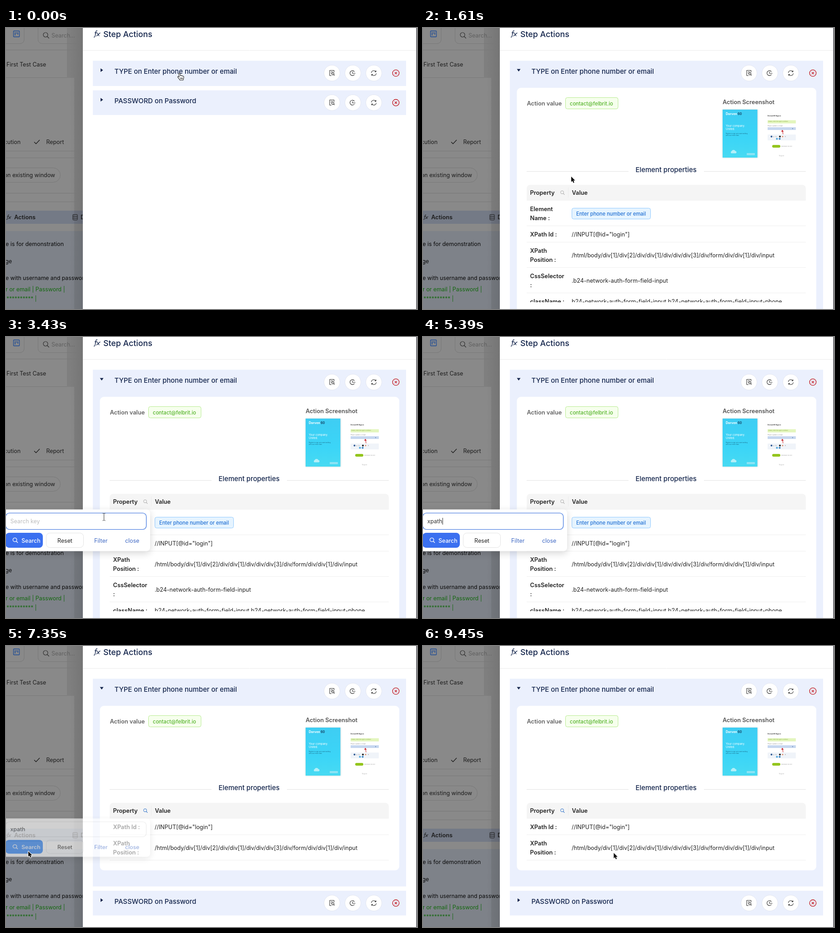
Write an HTML page with a canvas that moves like this. It is 904 px wide and 620 px high and loops after 9.73 s.

```html
<!DOCTYPE html>
<html lang="en">
<head>
<meta charset="utf-8">
<title>Step Actions</title>
<style>
  html, body { margin: 0; width: 100%; height: 100%; overflow: hidden; background: #fff; }
  canvas { display: block; }
</style>
</head>
<body>
<canvas id="stage" width="904" height="620"></canvas>
<script>
const stage = document.getElementById('stage').getContext('2d');
const layer = new OffscreenCanvas(904, 620).getContext('2d');
let ctx = stage;
const LOOP = 9730, STEP = 70;
const NAVY = '#14254c', INK = '#222', PANEL = '#ebf0fd';
const clamp = v => Math.max(0, Math.min(1, v));
const easeInOut = p => p < .5 ? 4 * p ** 3 : 1 - 4 * (1 - p) ** 3;

// y is the middle of the capital letters
function text(str, x, y, { size = 12.4, weight = 400, color = INK, align = 'left' } = {}) {
  ctx.font = `${weight} ${size}px Inter, sans-serif`;
  ctx.fillStyle = color;
  ctx.textAlign = align;
  ctx.fillText(str, x, y + size * .364);
}

function box(x, y, w, h, r, fill, stroke, lineWidth = 1) {
  ctx.beginPath();
  ctx.roundRect(x, y, w, h, r);
  if (fill) { ctx.fillStyle = fill; ctx.fill(); }
  if (stroke) { ctx.strokeStyle = stroke; ctx.lineWidth = lineWidth; ctx.stroke(); }
}

const dot = (x, y, r, fill, stroke, lineWidth) => box(x - r, y - r, 2 * r, 2 * r, r, fill, stroke, lineWidth);

function path(d, x, y, stroke, lineWidth = 1, fill) {
  ctx.save();
  ctx.translate(x, y);
  const shape = new Path2D(d);
  ctx.lineJoin = 'round';
  if (fill) { ctx.fillStyle = fill; ctx.fill(shape); }
  if (stroke) { ctx.strokeStyle = stroke; ctx.lineWidth = lineWidth; ctx.stroke(shape); }
  ctx.restore();
}

const rule = (x1, x2, y, color) => path(`M${x1} 0H${x2}`, 0, y, color);

function magnifier(x, y, r, color, lineWidth = 1.1) {
  dot(x, y, r, null, color, lineWidth);
  path(`M0 0l${r * .85} ${r * .85}`, x + r * .7, y + r * .7, color, lineWidth * 1.1);
}

function functionIcon(x, y, scale, color) {
  ctx.save();
  ctx.translate(x, y);
  ctx.scale(scale, scale);
  path('M8 -6.5C6 -8 5 -6.5 4.6 -4.5L3 4.5C2.6 6.8 1.6 7.6 0 6.8M2 -2.5H7M7.5 -2.5L12 5M14.3 -2.5L6 5', 0, 0, color, 1.4);
  ctx.restore();
}

function drawPage() {
  const line = '#787878', dark = '#1c1c1c';
  box(0, 0, 169, 620, 0, '#898989');
  box(0, 403, 169, 29, 0, '#747a86');
  box(0, 448, 169, 172, 0, '#7e8289');
  box(134, 0, 35, 110, 0, 'rgba(0,0,0,.07)');
  box(150, 110, 19, 510, 0, 'rgba(0,0,0,.07)');
  const shade = ctx.createLinearGradient(140, 0, 169, 0);
  shade.addColorStop(0, 'rgba(0,0,0,0)');
  shade.addColorStop(1, 'rgba(0,0,0,.08)');
  box(140, 0, 29, 620, 0, shade);

  for (const y of [48.5, 271.5, 286.5, 364.5, 383.5]) rule(0, 169, y, line);
  rule(0, 134, 109.5, line);
  box(-30, -20, 70, 54.5, 9, null, line);
  box(16.5, 6.5, 13, 13, 1, null, '#1c4b96', 1.3);
  path('M3.5 3V10M6.5 3V6M9.5 3V8', 16.5, 6.5, '#1c4b96', 1.5);
  box(70.5, -20, 120, 54.5, 9, null, line);
  magnifier(87, 15, 5, '#333', 1.2);
  text('Search...', 100, 16.5, { color: '#606060' });
  text('First Test Case', 1, 80, { color: dark });
  text('Execution', 32, 251, { color: dark, align: 'right' });
  path('M0 4.5L4 8.5L12 0', 62, 247, dark, 1.3);
  text('Report', 88.5, 251, { color: dark });
  box(-30, 308.5, 149.5, 32, 16, null, line);
  text('on existing window', 108, 324, { color: dark, align: 'right' });
  functionIcon(1, 417.5, .72, dark);
  text('Actions', 18, 417.5, { size: 12.8, weight: 600, color: dark });
  box(147, 411.5, 10, 12, 1, null, dark);
  path('M0 4H10M0 8H10M2 2H3M2 6H3M2 10H3', 147, 411.5, dark);
  text('Data', 164, 417.5, { size: 12.8, weight: 600, color: dark });
  text('e is for demonstration', -1, 476.5, { color: '#0a0a0a' });
  text('page', 13, 514.5, { color: '#0a0a0a', align: 'right' });
  text('e with username and password', -1, 551.5, { color: '#0a0a0a', size: 12.2 });
  text('r or email | Password |', -1, 576.5, { color: '#14680f' });
  text('********** |', 1, 597, { color: '#14680f', size: 11.8 });
}

function drawRow(y, label, turn) {
  ctx.save();
  ctx.translate(210.5, y + 20.7);
  ctx.rotate(turn * Math.PI / 2);
  path('M-2.5 -4L3 0L-2.5 4Z', 0, 0, null, 0, NAVY);
  ctx.restore();
  text(label, 238.5, y + 23.2, { size: 14.85, weight: 500, color: NAVY });
  const mid = y + 27.2;
  for (const x of [717, 763, 809]) dot(x, mid, 17.5, '#fff', '#e3e7f2');
  path('M-1 5.5H-5V-6H4.5V-2M-2.5 -3H2M-2.5 0H-.5', 717, mid, '#333', 1.1);
  magnifier(719, mid + 1.5, 2.4, '#333');
  path('M4.4 -3.1A5.4 5.4 0 1 0 4.4 3.1M0 -3V.5H6.5', 762, mid, '#333', 1.1);
  path('M-5.4 -.5A5.4 5.4 0 0 1 4.2 -3.4M5.4 .5A5.4 5.4 0 0 1 -4.2 3.4M4.8 -5.8V-2.8H1.8M-4.8 5.8V2.8H-1.8', 809, mid, '#333', 1.1);
  dot(857.5, mid, 7.2, null, '#c0141c', 1.3);
  path('M-2.6 -2.6L2.6 2.6M2.6 -2.6L-2.6 2.6', 857.5, mid, '#c0141c', 1.3);
}

function drawScreenshot() {
  ctx.save();
  ctx.shadowColor = 'rgba(0,0,0,.18)';
  ctx.shadowBlur = 3;
  const sky = ctx.createLinearGradient(0, 180, 0, 286);
  sky.addColorStop(0, '#3ecdf3');
  sky.addColorStop(.6, '#3bd5f7');
  sky.addColorStop(1, '#48daf2');
  box(659, 180, 76.5, 106, 0, sky);
  ctx.restore();
  text('Dorven', 666, 189.5, { size: 7, weight: 700, color: '#fff' });
  text('60', 692, 189, { size: 7, weight: 700, color: '#17496b' });
  text('Your company.', 666, 215.5, { size: 6, color: '#fff' });
  text('United.', 666, 222.5, { size: 6, color: '#fff' });
  text('Register to sign up to start working', 666, 233, { size: 2.9, color: '#17607f' });
  text('with your entire team', 666, 237, { size: 2.9, color: '#17607f' });
  path('M-5 3.5A3 3 0 0 1 -4 -1.5A4.5 4.5 0 0 1 4 -1.5A2.6 2.6 0 0 1 5 3.5Z', 683, 273, null, 0, '#b4eff8');
  box(712, 276, 18, 4.5, 1, '#8ee3f4');

  text('Dorven60 Sign in', 758, 193.5, { size: 3.5, weight: 700, color: '#333' });
  box(758, 203.5, 62, 7, 0, '#e3f5bd');
  text('Please, enter the login to continue', 759.5, 206, { size: 2.7, color: '#7fa53a' });
  text('Phone number or email', 758, 216, { size: 3, color: '#888' });
  box(758, 219, 62, 6, 0, '#c6d7f0');
  dot(813, 222, 1, '#6683b5');
  path('M2 10L1 4L-1.5 4.5L.5 0L4 4L2.2 4L3 10Z', 789.5, 224.5, null, 0, '#c8252c');
  box(758, 235, 62, 13, 1, '#f0f4f9');
  dot(766.5, 239.5, 2, '#315a94');
  text('a · b ·', 770.5, 239.5, { size: 3.5, color: '#777' });
  dot(785, 239.5, 2, '#222');
  dot(791, 239.5, 1.5, '#e08a63');
  dot(797, 239.5, 1, '#aaa');
  dot(778.5, 244.5, 2.1, '#4ba6dd');
  dot(784.5, 244.5, 2.1, '#3f86c4');
  box(768, 258, 18, 6, 3, '#94c51e');
  text('Remember me here', 788, 261, { size: 2.6, color: '#999' });
  text('Register', 783, 282, { size: 3, color: '#aaa' });
}

// Each entry: row height, label lines, value
const PROPERTIES = [
  [56, ['Element', 'Name :'], null],
  [36, ['XPath Id :'], '//INPUT[@id="login"]'],
  [56, ['XPath', 'Position :'], '/html/body/div[1]/div[2]/div/div[1]/div/div/div[3]/div/form/div/div[1]/div/input'],
  [56, ['CssSelector', ':'], '.b24-network-auth-form-field-input'],
  [36, ['className :'], 'b24-network-auth-form-field-input b24-network-auth-form-field-input-phone'],
];

function drawTable(t, filtered) {
  const head = t < 770 ? '#f0f4fe' : '#f5f5f5';
  box(228, 346, 614, 35, [8, 8, 0, 0], head);
  if (t >= 2100 && t < 2520) box(298, 350, 18, 27, 4, '#e6e6e6');
  text('Property', 235.5, 363.5, { size: 12.8, weight: 600 });
  magnifier(306, 362.5, 3.4, filtered ? '#2b6fc9' : '#aaa', 1);
  path('M0 0V22', 319.5, 352, '#ececec');
  text('Value', 327.5, 363.5, { size: 12.8, weight: 600 });

  ctx.save();
  ctx.beginPath();
  ctx.rect(228, 381, 614, 224);
  ctx.clip();
  let y = 380.7;
  for (const [height, lines, value] of filtered ? PROPERTIES.slice(1, 3) : PROPERTIES) {
    const mid = y + height / 2;
    lines.forEach((str, i) => text(str, 235.5, mid + 20 * (i - (lines.length - 1) / 2) + .5, { size: 12.8, weight: 600 }));
    if (value) text(value, 327, mid + .5, { size: 12.5 });
    else {
      box(327.5, mid - 11.2, 173, 24, 4, '#e6f4ff', '#91caff');
      text('Enter phone number or email', 337, mid + .9, { size: 11.1, weight: 500, color: '#1f6fd3' });
    }
    y += height;
    rule(228, 842, Math.floor(y) + .5, '#efefef');
  }
  ctx.restore();
}

function drawDrawer(t) {
  const filtered = t >= 7210;
  const open = easeInOut(clamp((t - 524) / 300));
  const bottom = filtered ? 530.5 : 128 + 534 * open;
  box(169, 0, 735, 620, 0, '#fff');
  box(902.5, 0, 1.5, 620, 0, '#45454a');
  rule(169, 902, 49.5, '#ececec');
  functionIcon(193, 13, 1, NAVY);
  text('Step Actions', 214, 13.5, { size: 17.8, weight: 500, color: NAVY });

  box(191, 72.3, 689, bottom - 72.3, 0, PANEL);
  if (open > 0) {
    ctx.save();
    ctx.beginPath();
    ctx.rect(191, 128, 689, bottom - 128);
    ctx.clip();
    box(206.5, 132, 658.5, (filtered ? 495 : 627) - 132, 9, '#fff');
    text('Action value', 228.5, 166.5, { size: 12.8, weight: 600, color: '#626262' });
    box(313.5, 153.5, 115.5, 25, 4, '#f6ffed', '#b7eb8f');
    text('contact@felbrit.io', 323, 166.7, { size: 11.1, weight: 500, color: '#55b32a' });
    text('Action Screenshot', 659, 163.7, { size: 12.8, weight: 600, color: '#555' });
    drawScreenshot();
    rule(228, 452, 316.5, '#e2e2e2');
    rule(618, 842, 316.5, '#e2e2e2');
    text('Element properties', 467.5, 312.7, { size: 14.85, weight: 500, color: NAVY });
    drawTable(t, filtered);
    ctx.restore();
  }
  drawRow(72.3, 'TYPE on Enter phone number or email', open);

  const next = bottom + 9.5;
  box(191, next, 689, 54.5, 0, PANEL);
  drawRow(next, 'PASSWORD on Password', 0);
}

const KEY_TIMES = [4130, 4620, 4970, 5110, 5390];

function drawPopupContent(t) {
  ctx.save();
  ctx.shadowColor = 'rgba(0,0,0,.16)';
  ctx.shadowBlur = 16;
  ctx.shadowOffsetY = 5;
  box(-20, 380.5, 337, 92, 8, '#fff');
  ctx.restore();

  const focused = t >= 2450 && t < 6580;
  if (focused) box(-1.2, 387.2, 311.4, 38.6, 9, '#dfeafd');
  box(-.5, 388.5, 309, 36, 8, '#fff', t < 2450 || t >= 7210 ? '#dcdcdc' : focused ? '#3f74dc' : '#4f86dc', 1.1);
  const typed = 'xpath'.slice(0, KEY_TIMES.filter(k => t >= k).length);
  text(typed || 'Search key', 9.5, 406.5, { color: typed ? '#333' : '#bdbdbd' });
  const caretOn = t < 3430 || (t >= 3990 && t < 5880);
  if (caretOn) box(10 + (typed ? ctx.measureText(typed).width : 0), 399, 1, 15, 0, '#222');

  box(-1, 432, 82, 33, 8, t >= 6370 ? '#3f8ffc' : '#3b70f0');
  magnifier(19.5, 447.5, 4.2, '#fff', 1.3);
  text('Search', 34, 449, { color: '#fff', weight: 500 });
  box(88.5, 432.5, 82, 32, 8, '#fff', '#e3e3e3');
  text('Reset', 129.5, 449, { align: 'center' });
  text('Filter', 194, 449, { color: '#3f69c4' });
  text('close', 262, 449, { color: '#3f69c4' });
}

// The popup fades as one layer while it stretches from its top edge
function drawPopup(t) {
  if (t < 2310 || t >= 7420) return;
  const shown = t < 7210 ? 1 - (1 - clamp((t - 2310) / 200)) ** 5 : 1 - ((t - 7210) / 190) ** 3;
  if (shown <= 0) return;
  layer.clearRect(0, 0, 904, 620);
  ctx = layer;
  drawPopupContent(t);
  ctx = stage;
  ctx.save();
  ctx.globalAlpha = shown;
  ctx.translate(0, 380);
  ctx.scale(1, .8 + .2 * shown);
  ctx.drawImage(layer.canvas, 0, -380);
  ctx.restore();
}

// Each move: start, end, then a quadratic curve
const MOVES = [
  [980, 1820, 381.5, 99.5, 368, 250, 308.5, 364.5],
  [2450, 3010, 308.5, 364.5, 300, 390, 228, 391],
  [3010, 3150, 228, 391, 222, 394, 215.5, 397],
  [6020, 6440, 204, 399, 120, 405, 49, 453],
  [7980, 8470, 49, 453, 300, -95, 413, 428],
  [9240, 9450, 413, 428, 416, 442, 419.5, 456.5],
];
const HAND = 'M-1.4 1.3C-1.4 -.4 1.2 -.4 1.3 1.3L1.9 5.6C3 4.8 4.2 5 4.6 6.1C5.6 5.4 6.7 5.8 7 6.8C8.3 6.2 9.4 7 9.5 8.4C9.6 11 8.6 12.5 8.2 15.5H1C.2 13 -2.6 11 -3.8 9C-4.5 7.6 -2.9 6.8 -1.8 7.7L-.6 8.8ZM2.4 10V13.2M4.5 10V13.2M6.5 10V13.2';
const ARROW = 'M0 0V12L2.7 9.5L4.6 14L6.8 13L4.9 8.7H8.6Z';
const IBEAM = 'M-3 -8C-1 -8 0 -7.5 0 -6.5V6.5C0 7.5 -1 8 -3 8M3 -8C1 -8 0 -7.5 0 -6.5M0 6.5C0 7.5 1 8 3 8';

function drawCursor(t) {
  if (t >= 4130 && t < 6090) return;
  const [start, end, x0, y0, cx, cy, x1, y1] = MOVES.findLast(m => t >= m[0]) || MOVES[0];
  const p = clamp((t - start) / (end - start)), e = p * p * (3 - 2 * p), q = 1 - e;
  const x = q * q * x0 + 2 * q * e * cx + e * e * x1;
  const y = q * q * y0 + 2 * q * e * cy + e * e * y1;
  if (t < 1190 || (t >= 1960 && t < 2660)) path(HAND, x, y, '#222', 1.1, '#fff');
  else if (t >= 2660 && t < 6230) path(IBEAM, x, y, '#333', 1);
  else {
    path(ARROW, x, y, '#fff', 2);
    path(ARROW, x, y, null, 0, '#111');
  }
}

function frame() {
  const t = Math.floor(performance.now() % LOOP / STEP) * STEP;
  drawPage();
  drawDrawer(t);
  drawPopup(t);
  drawCursor(t);
  requestAnimationFrame(frame);
}
frame();
</script>
</body>
</html>
```
